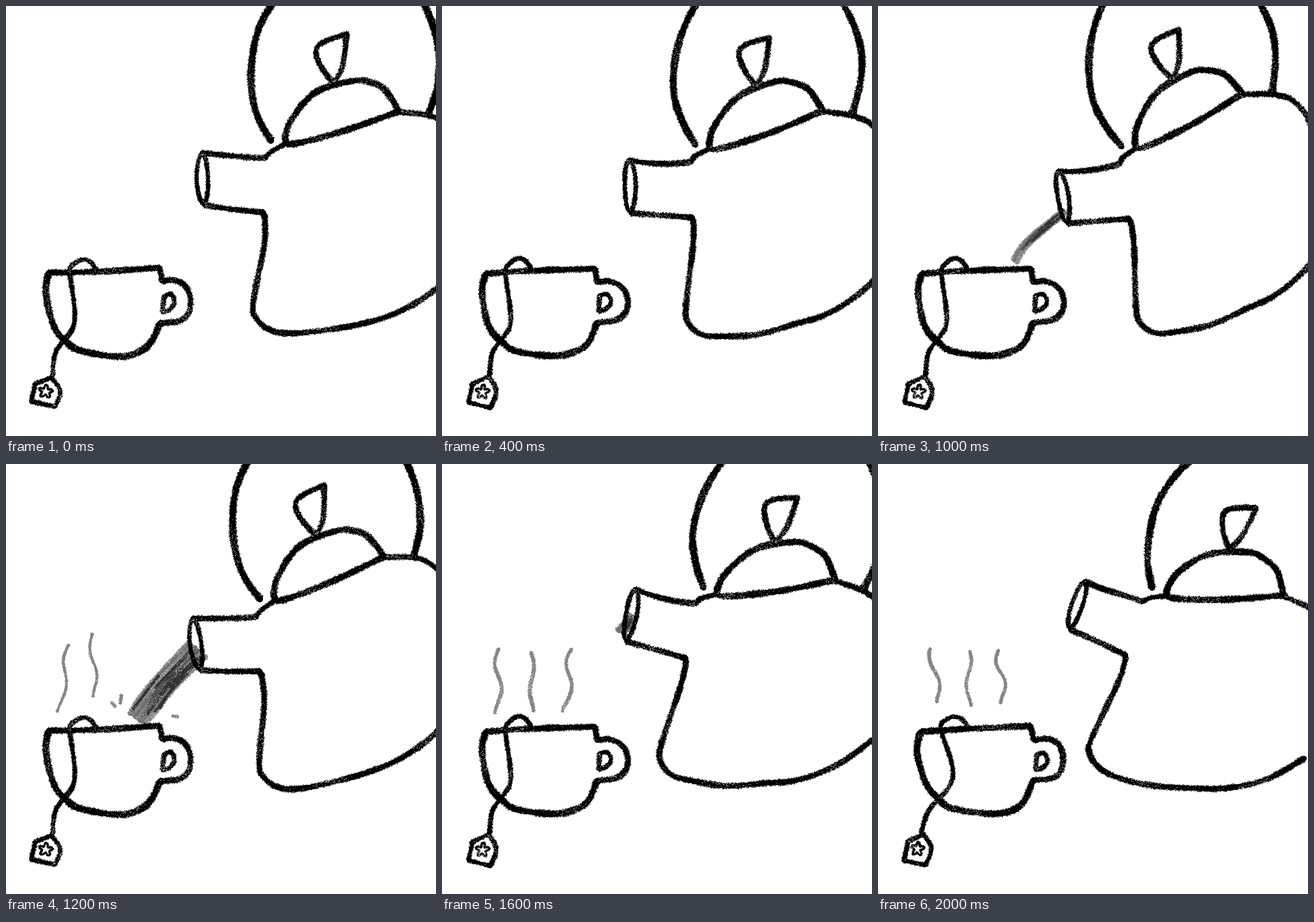
Animation of 748 by 748 pixels, one loop 2.1 s. Source, as an HTML page with a canvas:

```html
<!DOCTYPE html>
<html lang="en">
<head>
<meta charset="utf-8">
<title>Pouring tea</title>
<style>
html, body { margin: 0; width: 100%; height: 100%; overflow: hidden; background: #fff; }
canvas { display: block; width: 748px; height: 748px; }
</style>
</head>
<body>
<canvas id="stage" width="748" height="748"></canvas>
<script>
const SIZE = 748, STEP = 100, VERSIONS = 3;
const GREY = '#858585', MID = '#707070', DARK = '#333';
const RAD = Math.PI / 180;

// A stroke has a brush width and key points; a repeated point makes a corner.
const line = (w, ...xy) => {
  const pts = [];
  for (let i = 0; i < xy.length; i += 2) pts.push([xy[i], xy[i + 1]]);
  return { w, pts };
};

const curve = (w, n, at) => ({ w, pts: Array.from({ length: n + 1 }, (_, i) => at(i / n)) });

const arc = (w, cx, cy, rx, ry, from, to, tilt = 0) => curve(w, 16, t => {
  const a = (from + (to - from) * t) * RAD, x = rx * Math.cos(a), y = ry * Math.sin(a);
  const c = Math.cos(tilt * RAD), s = Math.sin(tilt * RAD);
  return [cx + x * c - y * s, cy + x * s + y * c];
});

const flower = (cx, cy) => curve(2.8, 40, t => {
  const a = t * 2 * Math.PI, r = 9 + 3.4 * Math.cos(5 * a + 1);
  return [cx + r * Math.cos(a), cy + r * Math.sin(a)];
});

const wisp = (w, x, top, bottom, lean, amp) => curve(w, 12, t =>
  [x + lean * t - amp * Math.sin(t * 7.5), top + (bottom - top) * t]);

const cup = [
  line(10, 75, 465, 160, 461, 266, 456),
  line(11, 74, 467, 69, 500, 82, 555, 104, 583, 130, 600, 195, 609, 232, 602, 254, 585, 269, 551),
  line(9.5, 266, 456, 271, 480, 271, 480, 293, 478, 313, 488, 322, 511, 318, 534, 302, 547, 269, 551),
  line(7.5, 275, 505, 288, 502, 294, 516, 285, 528, 273, 532, 273, 532, 275, 505),
  line(7.5, 52, 657, 80, 645, 80, 645, 94, 670, 84, 698, 84, 698, 45, 689, 45, 689, 52, 657),
  flower(69.5, 670.5)
];
const thread = line(7.5, 156, 457, 146, 444, 133, 440, 118, 447, 110, 462, 119, 523, 117, 560, 88, 602, 82, 642);
// How far the thread swings out in each redrawn version.
const sway = [0, 0, 9];

const pot = [
  arc(11.5, 529, 100, 163, 190, 130, 375),
  line(10.5, 448, 240, 452, 205, 485, 150, 545, 116, 575, 113, 605, 122, 634, 154),
  line(10.5, 634, 154, 545, 207, 462, 246, 448, 238),
  line(9, 513, 127, 490, 105, 475, 78, 484, 60, 522, 40, 522, 40, 523, 95, 513, 127),
  line(8.5, 448, 249, 428, 264, 420, 276),
  line(9.5, 313, 289, 345, 287, 385, 282, 420, 276),
  arc(7, 321, 332, 9.5, 43, -90, 270, -10),
  line(9.5, 331, 377, 370, 375, 436, 371),
  line(9.5, 438, 374, 446, 420, 448, 525, 457, 553, 485, 569, 525, 567, 580, 553, 640, 528, 695, 500, 750, 453, 793, 391),
  line(9, 637, 155, 685, 153, 715, 160, 735, 177, 750, 200, 763, 240)
];
const pivot = { x: 473.5, y: 221.5 };

// Each pose lasts for the three versions; angle in degrees, then the pivot's place.
const scenes = [
  { a: 10.6, x: 512.5, y: 219.5 },
  { a: 8.5, x: 493.5, y: 226.5 },
  { a: 0, x: 473.5, y: 221.5 },
  { a: 0, x: 473.5, y: 221.5, tea: line(17, 325, 357, 275, 397, 252, 420, 238, 446) },
  { a: 4.6, x: 491.5, y: 215, tea: line(45, 333, 322, 275, 382, 250, 416, 229, 446), steam: [
    wisp(4, 108, 313, 430, -12, 6), wisp(4, 151, 296, 406, 4, 5),
    line(5, 183, 416, 190, 424), line(4.5, 200, 402, 199, 418), line(4, 288, 437, 298, 438)
  ] },
  { a: 20.2, x: 509.5, y: 211, tea: line(20, 327, 262, 322, 276, 311, 292), steam: [
    wisp(5.5, 100, 321, 433, -4, 6), wisp(6, 154, 329, 431, 3, -4), wisp(5.5, 226, 321, 429, -10, 7)
  ] },
  { a: 27, x: 533, y: 215.5, steam: [
    wisp(5.5, 91, 323, 414, 16, 5), wisp(5, 159, 325, 419, 0, -4), wisp(5, 211, 323, 417, 6, 6)
  ] }
];
const STEPS = scenes.length * VERSIONS;

function random(seed) {
  let s = seed >>> 0;
  return () => {
    s = (s + 0x6D2B79F5) >>> 0;
    let t = Math.imul(s ^ (s >>> 15), 1 | s);
    t = (t + Math.imul(t ^ (t >>> 7), 61 | t)) ^ t;
    return ((t ^ (t >>> 14)) >>> 0) / 4294967296;
  };
}

// Catmull-Rom curve through the points, sampled about once per pixel.
function smooth(pts) {
  const out = [];
  for (let i = 0; i < pts.length - 1; i++) {
    const b = pts[i], c = pts[i + 1];
    const a = pts[i - 1] || b, d = pts[i + 2] || c;
    const n = Math.ceil(Math.hypot(c[0] - b[0], c[1] - b[1]));
    const at = (j, t) => {
      const k1 = c[j] - a[j];
      const k2 = 2 * a[j] - 5 * b[j] + 4 * c[j] - d[j];
      const k3 = 3 * (b[j] - c[j]) + d[j] - a[j];
      return b[j] + 0.5 * t * (k1 + t * (k2 + t * k3));
    };
    for (let k = 0; k < n; k++) out.push([at(0, k / n), at(1, k / n)]);
  }
  out.push(pts[pts.length - 1]);
  return out;
}

// Draws one stroke with a crayon edge and patches of paper grain.
function chalk(g, { w, pts }, color = '#000') {
  const rnd = random(pts[0][0] * 977 + pts[0][1] * 131 + w * 7919);
  const p = smooth(pts), phase = rnd() * 6, edge = Math.min(1, w / 9);
  const radius = i => w / 2 * (1 + 0.07 * Math.sin(i / 19 + phase) + 0.05 * Math.sin(i / 7 + phase * 2));
  const dot = (i, off, size) => {
    const a = p[Math.max(0, i - 2)], b = p[Math.min(p.length - 1, i + 2)];
    const dx = b[0] - a[0], dy = b[1] - a[1], len = Math.hypot(dx, dy) || 1;
    g.fillRect(p[i][0] - dy / len * off - size / 2, p[i][1] + dx / len * off - size / 2, size, size);
  };

  g.lineCap = 'round';
  g.strokeStyle = color;
  for (let i = 0; i < p.length - 1; i += 3) {
    g.lineWidth = 2 * (radius(i) - 0.6 * edge);
    g.beginPath();
    g.moveTo(...p[i]);
    g.lineTo(...p[Math.min(i + 3, p.length - 1)]);
    g.stroke();
  }

  g.fillStyle = color;
  for (let i = 0; i < p.length; i++) {
    for (const side of [-1, 1]) {
      if (rnd() < 0.7) dot(i, side * (radius(i) + (rnd() * 1.9 - 1) * edge), 0.9 + rnd() * 0.9);
    }
  }

  g.fillStyle = '#fff';
  for (let i = 0; i < p.length; i++) {
    const grain = 0.07 + 0.6 * Math.max(0, Math.sin(i / 31 + phase * 3)) ** 2;
    for (let k = 0; k < 2; k++) {
      if (rnd() < grain * edge) dot(i, (rnd() * 2 - 1) * radius(i), 0.6 + rnd() * 0.7);
    }
  }
}

// Tea: grey strands side by side with darker scribbles over them.
function pour(g, { w, pts }, seed) {
  const rnd = random(seed * 53 + 5), a = pts[0], b = pts[pts.length - 1];
  const len = Math.hypot(b[0] - a[0], b[1] - a[1]);
  const nx = (b[1] - a[1]) / len, ny = (a[0] - b[0]) / len;
  const strand = (off, width, from, to, color) => {
    const all = smooth(pts.map(([x, y]) => {
      const o = off + (rnd() - 0.5) * 3;
      return [x + nx * o, Math.min(450, y + ny * o)];
    }));
    const part = all.slice(Math.floor(from * all.length), Math.ceil(to * all.length));
    chalk(g, { w: width, pts: part.filter((_, i) => i % 12 === 0 || i === part.length - 1) }, color);
  };
  const n = Math.round(w / 5), span = w - 8;
  for (let i = 0; i < n; i++) {
    strand((i / (n - 1) - 0.5) * span, 8, rnd() * 0.04, 1 - rnd() * 0.04, i % 2 ? MID : GREY);
  }
  for (let i = 0; i < n * 2; i++) {
    const from = rnd() * 0.5;
    strand((rnd() - 0.5) * span, 2.5 + rnd() * 2, from, from + 0.3 + rnd() * 0.2, i % 4 ? DARK : '#555');
  }
}

// Redraws a stroke slightly differently in each version, so the line boils.
const boil = ({ w, pts }, version, size = 1.2) => ({
  w,
  pts: pts.map(([x, y]) => [
    x + size * Math.sin(x / 23 + y / 31 + version * 2.1),
    y + size * Math.cos(x / 29 - y / 19 + version * 2.1)
  ])
});

const swing = ({ w, pts }, amount) => ({
  w,
  pts: pts.map(([x, y]) => [x + amount * Math.sin(Math.max(0, y - 460) / 140 * Math.PI), y])
});

function drawStep(g, step) {
  const version = step % VERSIONS, scene = scenes[Math.floor(step / VERSIONS)];
  g.fillStyle = '#fff';
  g.fillRect(0, 0, SIZE, SIZE);

  if (scene.tea) pour(g, scene.tea, step);
  for (const s of scene.steam || []) chalk(g, boil(s, version, 1.5), GREY);

  g.save();
  g.translate(scene.x, scene.y);
  g.rotate(scene.a * RAD);
  g.translate(-pivot.x, -pivot.y);
  for (const s of pot) chalk(g, boil(s, version));
  g.restore();

  for (const s of cup) chalk(g, boil(s, version));
  chalk(g, boil(swing(thread, sway[version]), version));
}

const stage = document.getElementById('stage').getContext('2d');
const sheets = Array.from({ length: STEPS }, (_, step) => {
  const sheet = document.createElement('canvas');
  sheet.width = sheet.height = SIZE;
  drawStep(sheet.getContext('2d'), step);
  return sheet;
});

const start = performance.now();
let shown = -1;
function tick() {
  const step = Math.floor((performance.now() - start) / STEP) % STEPS;
  if (step !== shown) {
    stage.drawImage(sheets[step], 0, 0);
    shown = step;
  }
  requestAnimationFrame(tick);
}
tick();
</script>
</body>
</html>
```
